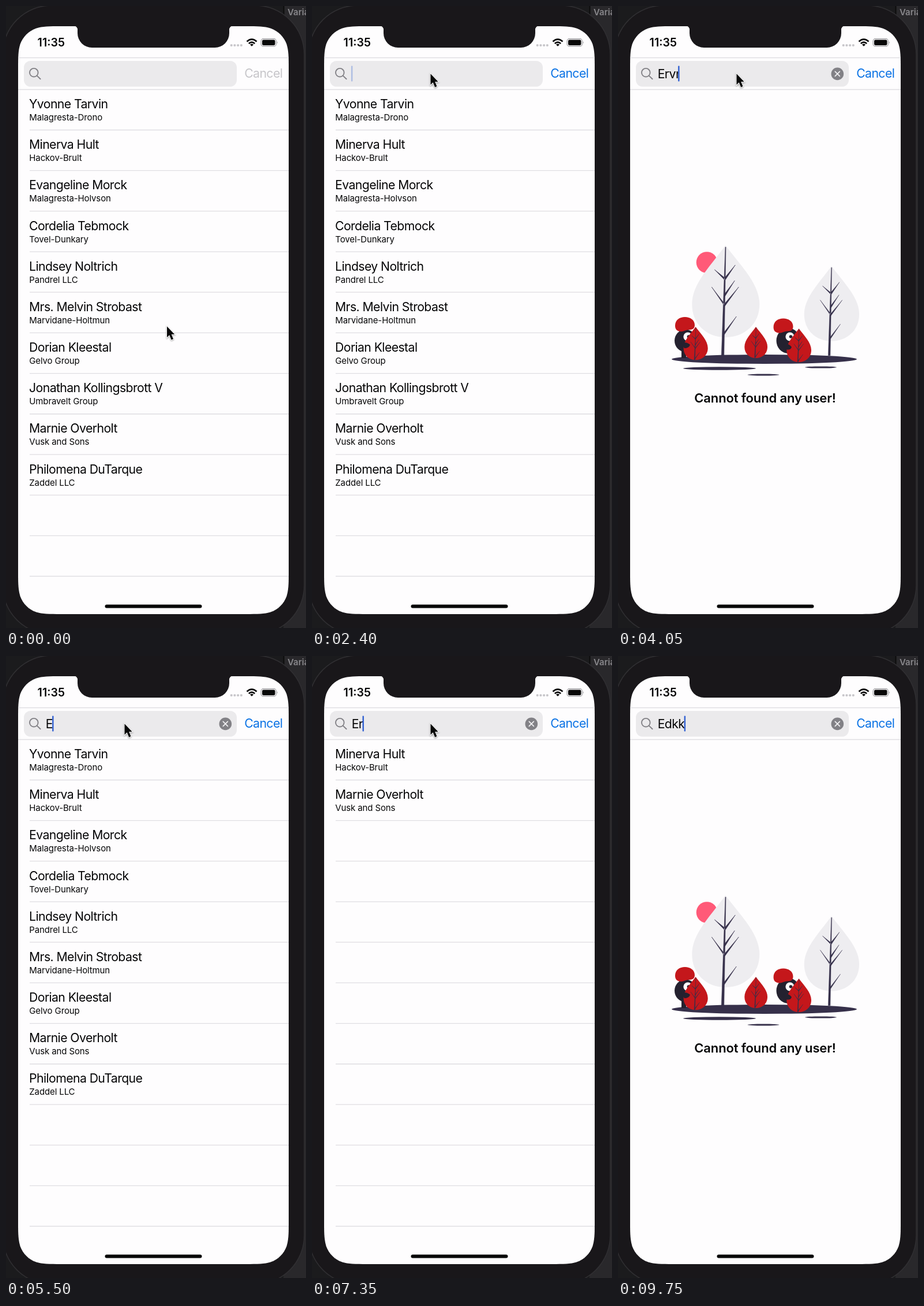
Recreate the animation shown at these times as an HTML page. Size 520 by 1076 pixels, loop 9800 ms.

```html
<!DOCTYPE html>
<html lang="en">
<head>
<meta charset="utf-8">
<title>User search</title>
<style>
  html, body { margin: 0; width: 100%; height: 100%; overflow: hidden; background: #1b1b1d; }
  svg { display: block; }
  text { font-family: Inter, "Liberation Sans", sans-serif; fill: #050506; }
  .body { font-size: 21.25px; letter-spacing: -.6px; }
  .detail { font-size: 15px; letter-spacing: -.12px; }
  .line { stroke: #dfdee2; stroke-width: 1.3; }
  .ink { fill: #36304a; }
  .dark { fill: #24212f; }
  .red { fill: #c4171b; }
  #cursor { filter: drop-shadow(0 1px 1px #0006); }
</style>
</head>
<body>
<svg width="520" height="1076" viewBox="0 0 520 1076">
  <defs><clipPath id="clip"><rect id="clipBox" x="66" y="98" width="0" height="40"/></clipPath></defs>

  <rect x="481" width="39" height="1076" fill="#29282b"/>
  <path d="M481.5 0V30" stroke="#0c0c0d" stroke-width="2"/>
  <text x="488" y="16" font-size="15" font-weight="600" style="fill:#89888c">Varia</text>
  <rect x="-6" y="-1" width="523" height="1088" rx="85" fill="#19171a" stroke="#302f32" stroke-width="1.5"/>
  <path id="screen" fill="#fefdfe"/>
  <path d="M117 34H394A7 7 0 0 0 387 42V47A25 25 0 0 1 362 72H149A25 25 0 0 1 124 47V42A7 7 0 0 0 117 34Z" fill="#19171a"/>

  <text x="54.6" y="70.2" font-size="19.6" font-weight="600">11:35</text>
  <g fill="#c7c6ca">
    <circle cx="390.7" cy="68" r="2.1"/><circle cx="396.4" cy="68" r="2.1"/>
    <circle cx="402.1" cy="68" r="2.1"/><circle cx="407.8" cy="68" r="2.1"/>
  </g>
  <g fill="none" stroke="#080808" stroke-width="2.7">
    <path d="M417.5 61.5Q426 53.8 434.5 61.5M420.8 65Q426 60.4 431.2 65"/>
    <path d="M423 66.7Q426 64.3 429 66.7L426 69.8Z" fill="#080808" stroke="none"/>
  </g>
  <rect x="442.2" y="56.7" width="26" height="13" rx="3.8" fill="none" stroke="#9c9b9f" stroke-width="1.2"/>
  <rect x="444" y="58.5" width="22.4" height="9.4" rx="2.2" fill="#080808"/>
  <path d="M469.8 61Q472 63.2 469.8 65.4Z" fill="#9c9b9f"/>

  <path class="line" d="M21 89.5H490M21 144.5H490"/>
  <rect x="31" y="95" width="369" height="44.5" rx="11.5" fill="#ebeaec"/>
  <g fill="none" stroke="#828186" stroke-width="1.9" stroke-linecap="round">
    <circle cx="48.3" cy="115.2" r="7.3"/><path d="M53.7 120.6L59.6 126.3"/>
  </g>
  <g clip-path="url(#clip)"><text id="field" class="body" x="68.7" y="125"></text></g>
  <rect id="caret" y="103.5" width="2.5" height="27" rx="1" fill="#3664d2"/>
  <g id="clear">
    <circle cx="380.3" cy="117.4" r="10.8" fill="#828186"/>
    <path d="M376.3 113.4l8 8m0-8l-8 8" stroke="#f0eff1" stroke-width="1.8" stroke-linecap="round"/>
  </g>
  <text id="cancel" class="body" x="446.2" y="124" text-anchor="middle">Cancel</text>

  <g id="list"></g>
  <g id="empty"></g>
  <rect x="171.5" y="1035.5" width="168" height="6" rx="3" fill="#080808"/>
  <path id="cursor" d="M0 0V19L4.2 15L7.6 23.2L11 21.8L7.7 13.8H13.2Z" fill="#080808" stroke="#fff" stroke-width="2" paint-order="stroke"/>
</svg>
<script>
const LOOP = 9800, ROW = 70.18, FOCUS = 1500;
const $ = id => document.getElementById(id);
const clamp = v => Math.min(1, Math.max(0, v));
const smooth = v => (v = clamp(v), v * v * (3 - 2 * v));
const show = (el, on) => el.setAttribute("display", on ? "inline" : "none");
const shift = (el, x, y) => el.setAttribute("transform", `translate(${x} ${y})`);

const users = [
  ["Yvonne Tarvin", "Malagresta-Drono"],
  ["Minerva Hult", "Hackov-Brult"],
  ["Evangeline Morck", "Malagresta-Holvson"],
  ["Cordelia Tebmock", "Tovel-Dunkary"],
  ["Lindsey Noltrich", "Pandrel LLC"],
  ["Mrs. Melvin Strobast", "Marvidane-Holtmun"],
  ["Dorian Kleestal", "Gelvo Group"],
  ["Jonathan Kollingsbrott V", "Umbravelt Group"],
  ["Marnie Overholt", "Vusk and Sons"],
  ["Philomena DuTarque", "Zaddel LLC"]
];

// Field content after each key press
const keys = [
  [0, ""], [3300, "E"], [3500, "Er"], [3800, "Erv"], [4050, "Ervn"], [4250, "Ervnk"],
  [4450, "Ervnkj"], [4650, "Ervnk"], [4850, "Ervn"], [5000, "Erv"], [5250, "Er"],
  [5500, "E"], [5650, ""], [5850, "E"], [6100, "Er"], [6450, "Erk"], [6650, "Erkd"],
  [6850, "Erkdj"], [7000, "Erkd"], [7150, "Erk"], [7300, "Er"], [7550, "E"],
  [7800, "Ed"], [8050, "Edk"], [8450, "Edkk"]
].map(([time, text]) => {
  $("field").textContent = text;
  return { time, text, width: text ? $("field").getComputedTextLength() : 0 };
});

// Rectangle with continuous corners: the curve starts well before the radius
function squircle(x, y, w, h, r) {
  const far = 1.53 * r, near = .87 * r, a = .63 * r, b = .075 * r, c = .373 * r, d = .169 * r;
  const corner = (px, py, sx, sy, swap) => {
    const points = [[0, near], [0, near], [b, a], [d, c], [c, d], [a, b], [near, 0], [near, 0], [far, 0]];
    points[0] = [0, 1.088 * r];
    points[6] = [near, 0];
    points[7] = [1.088 * r, 0];
    const run = swap ? [[0, far], ...points].reverse() : [[0, far], ...points];
    const [start, ...rest] = run.map(([u, v]) => `${px + sx * u} ${py + sy * v}`);
    return `L${start}C${rest.join(" ")}`;
  };
  const d0 = corner(x, y, 1, 1) + corner(x + w, y, -1, 1, true) +
    corner(x + w, y + h, -1, -1) + corner(x, y + h, 1, -1, true);
  return "M" + d0.slice(1) + "Z";
}
$("screen").setAttribute("d", squircle(21, 35, 469, 1017, 49));

// Leaf-shaped tree with its tip at (x, y)
function tree(x, y, scale, fill, trunk, branch = 1) {
  const twig = (x1, y1, x2, y2) => `M${x1} ${y1}L${x2 - .5} ${y2 - 3}L${x2} ${y2 + 1.5}Z`;
  const twigs = [[-19, 42, -1, 59], [17, 34, 0, 58], [16, 61, -1, 87],
    [-24, 72, -2, 103], [23, 72, -2, 105], [19, 123, -4, 156]];
  return `<g transform="translate(${x} ${y}) scale(${scale})">
    <path fill="${fill}" d="M0 0C-25 35-58 66-58 102C-58 136-33 159 0 159S59 136 59 102C59 66 26 35 0 0Z"/>
    <path class="ink" stroke="#36304a" stroke-width="${branch}" d="M-.3 ${trunk < 190 ? 40 : 3}L-7 ${trunk}H-2.5L.7 3Z${twigs.map(t => twig(...t)).join("")}"/>
  </g>`;
}
const oval = (x, y, rx, ry, cls = "ink") =>
  `<ellipse class="${cls}" cx="${x}" cy="${y}" rx="${rx}" ry="${ry}"/>`;
const eye = (x, y) => `<circle cx="${x}" cy="${y}" r="7.6" fill="#fff"/>` + oval(x + 1.5, y, 2.8, 2.8, "dark");
const hair = (x, y) => `<path class="red" transform="translate(${x} ${y})"
  d="M-17 2C-17-8-9-13 0-13S17-8 17 1C17 8 12 9 7 9C2 9-3 13-9 12C-14 11-17 8-17 2Z"/>`;

$("empty").innerHTML =
  `<circle cx="154" cy="443.5" r="18.3" fill="#ff5a78"/>` +
  tree(186.3, 414, 1, "#eeedf0", 190, .5) + tree(370, 450, .815, "#eeedf0", 190, .5) +
  oval(253.5, 611, 160.5, 8) + oval(176, 627, 63, 2.8) +
  oval(252, 638, 27.5, 1.5) + oval(351.5, 625, 27.5, 1.6) +
  `<path class="dark" d="M110 592h8v17h-8z"/>` +
  oval(117, 579, 19, 19.5, "dark") + eye(121, 572) + hair(116, 551) +
  oval(295, 579, 20.5, 22, "dark") + eye(298, 572) + hair(286.5, 553.5) +
  tree(134.5, 555, .36, "#c4171b", 158) + tree(239, 555, .34, "#c4171b", 156) +
  tree(313.5, 558, .365, "#c4171b", 158) +
  `<path class="dark" d="M110 583Q118 580 125 586Q123 592 115 592ZM286 585Q295 582 301 590Q299 596 291 594Z"/>` +
  `<text x="255" y="686" text-anchor="middle" font-size="22" font-weight="600" letter-spacing="-.15">Cannot found any user!</text>`;

let rules = "";
for (let i = 0; i < 12; i++) rules += `M41 ${214.5 + i * ROW}H490`;
$("list").innerHTML = `<path class="line" d="${rules}"/>` + users.map(([name, company]) =>
  `<g><text class="body" x="40" y="177">${name}</text><text class="detail" x="40.3" y="198">${company}</text></g>`).join("");
const rows = [...$("list").querySelectorAll("g")];

function caretOpacity(idle) {
  if (idle < 350) return 1;
  const p = (idle - 350) % 1000;
  return p < 300 ? 1 - p / 300 : p < 550 ? 0 : clamp((p - 485) / 200);
}

function draw(t) {
  const index = keys.findLastIndex(k => k.time <= t);
  const key = keys[index], before = keys[index - 1] || key;

  let found = 0;
  users.forEach(([name], i) => {
    const match = name.toLowerCase().includes(key.text.toLowerCase());
    show(rows[i], match);
    if (match) shift(rows[i], 0, ROW * found++);
  });
  show($("list"), found);
  show($("empty"), !found);
  show($("clear"), key.text);

  // The caret slides over a newly typed letter and uncovers it
  const slide = key.width > before.width ? clamp(.4 + (t - key.time) / 80) : 1;
  const width = before.width + (key.width - before.width) * slide;
  $("field").textContent = key.text;
  $("clipBox").setAttribute("width", width + 3.5);
  $("caret").setAttribute("x", 67.9 + width);
  $("caret").setAttribute("opacity", t < FOCUS ? 0 : caretOpacity(t - Math.max(FOCUS, key.time)));

  const active = clamp((t - FOCUS + 50) / 150);
  const mix = (a, b) => a + (b - a) * active;
  $("cancel").style.fill = `rgb(${mix(198, 8)} ${mix(197, 113)} ${mix(201, 228)})`;

  const reach = smooth((t - 200) / 900), leave = clamp((t - 8800) / 600) ** 2;
  shift($("cursor"), 279 - 73.5 * reach + 60 * leave, 554.3 - 437 * reach - 150 * leave);
}

(function frame() {
  draw(performance.now() % LOOP);
  requestAnimationFrame(frame);
})();
</script>
</body>
</html>
```
